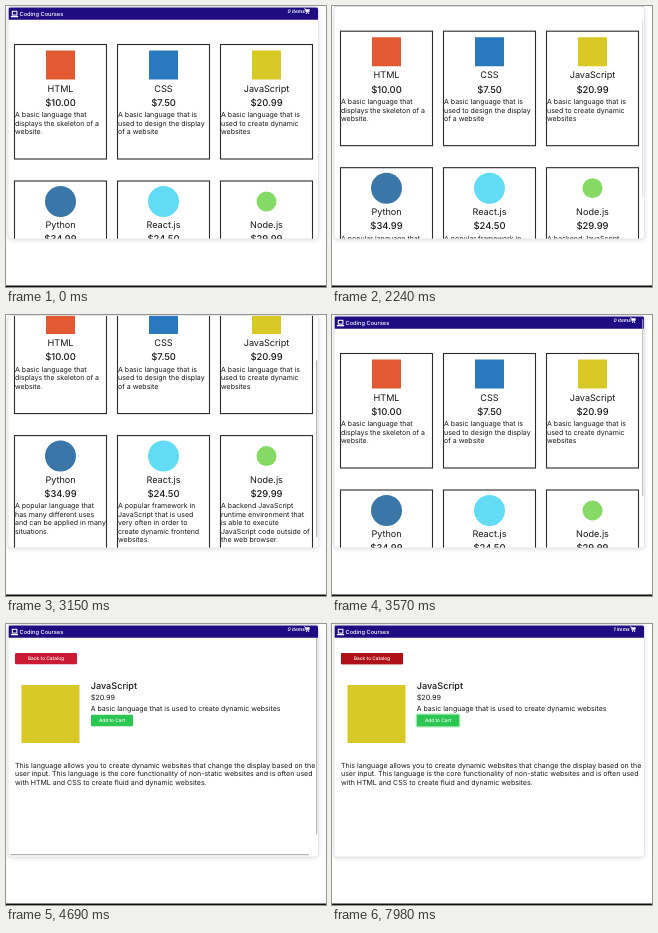
An HTML page with a canvas for the animation above (8 s loop, 320x281 px).

```html
<!DOCTYPE html>
<html lang="en">
<head>
<meta charset="utf-8">
<title>Course shop</title>
<style>
html, body { margin: 0; height: 100%; overflow: hidden; background: #fff; }
canvas { display: block; }
</style>
</head>
<body>
<canvas id="stage" width="320" height="281"></canvas>
<script>
const ctx = document.getElementById('stage').getContext('2d');
const LOOP = 8000, MAX_SCROLL = 63.5, PAGE_SWITCH = 4130, ADDED = 6300;
const INK = '#161618';
ctx.textRendering = 'geometricPrecision';

const courses = [
  { name: 'HTML', price: '$10.00', color: '#e35a32', size: 29,
    text: ['A basic language that', 'displays the skeleton of a', 'website.'] },
  { name: 'CSS', price: '$7.50', color: '#2a78bd', size: 29,
    text: ['A basic language that is', 'used to design the display', 'of a website'] },
  { name: 'JavaScript', price: '$20.99', color: '#d9c926', size: 29,
    text: ['A basic language that is', 'used to create dynamic', 'websites'] },
  { name: 'Python', price: '$34.99', color: '#3a76a8', size: 31, round: true,
    text: ['A popular language that', 'has many different uses', 'and can be applied in many', 'situations.'] },
  { name: 'React.js', price: '$24.50', color: '#62dcf5', size: 31, round: true,
    text: ['A popular framework in', 'JavaScript that is used', 'very often in order to', 'create dynamic frontend', 'websites.'] },
  { name: 'Node.js', price: '$29.99', color: '#85d965', size: 20, round: true,
    text: ['A backend JavaScript', 'runtime environment that', 'is able to execute', 'JavaScript code outside of', 'the web browser.'] }
];

const ramp = (t, from, to) => Math.min(1, Math.max(0, (t - from) / (to - from)));

// Piecewise linear value through [time, value] points
function track(t, points) {
  let [lastTime, value] = points[0];
  for (const [time, next] of points.slice(1)) {
    if (t < time) return value + (next - value) * ramp(t, lastTime, time);
    [lastTime, value] = [time, next];
  }
  return value;
}

const scrollAt = t => track(t, [[2170, 0], [2240, 13], [2310, 35], [2380, 51], [2450, 60],
  [2520, MAX_SCROLL], [3110, MAX_SCROLL], [3180, 48], [3250, 24], [3310, 8], [3360, 0]]);

function label(str, x, y, size, { color = INK, weight = 400, align = 'left', style = '' } = {}) {
  ctx.font = `${style} ${weight} ${size}px Inter, sans-serif`;
  ctx.fillStyle = color;
  ctx.textAlign = align;
  ctx.fillText(str, x, y);
}

function box(x, y, w, h, color, radius = 0) {
  ctx.fillStyle = color;
  ctx.beginPath();
  ctx.roundRect(x, y, w, h, radius);
  ctx.fill();
}

function badge({ color, round }, x, y, size) {
  box(x - size / 2, y - size / 2, size, size, color, round ? size / 2 : 0);
}

function paragraph(lines, x, y, lineHeight) {
  lines.forEach((line, i) => label(line, x, y + i * lineHeight, 7));
}

function faded(alpha, draw) {
  ctx.save();
  ctx.globalAlpha = alpha;
  draw();
  ctx.restore();
}

function button(str, x, y, w, base, dark, hover) {
  box(x, y, w, 11.4, base, 1.2);
  faded(hover, () => box(x, y, w, 11.4, dark, 1.2));
  label(str, x + w / 2, y + 7.5, 4.8, { color: '#fff', weight: 500, align: 'center' });
}

function laptopIcon() {
  ctx.strokeStyle = '#fff';
  ctx.lineWidth = 1;
  ctx.strokeRect(6.3, 5.3, 4.6, 3.8);
  box(4.8, 10, 7.4, 1.3, '#fff', 0.6);
}

function cartIcon() {
  ctx.strokeStyle = '#fff';
  ctx.lineWidth = 0.7;
  ctx.beginPath();
  ctx.moveTo(298, 2.8);
  ctx.lineTo(299.3, 2.8);
  ctx.lineTo(300.3, 6.4);
  ctx.lineTo(303, 6.4);
  ctx.stroke();
  box(299.6, 3.3, 4, 2.4, '#fff');
  box(299.9, 6.9, 1.2, 1.2, '#fff', 0.6);
  box(302.1, 6.9, 1.2, 1.2, '#fff', 0.6);
}

function header(t) {
  box(2.5, 1.5, 309.5, 12.2, '#200c82');
  laptopIcon();
  label('Coding Courses', 13.5, 10.4, 5.7, { color: '#fff', weight: 500 });
  label(`${t < ADDED ? 0 : 1} items`, 281.5, 7, 4.9, { color: '#fff', weight: 600, style: 'italic' });
  cartIcon();
}

function card(course, i) {
  const x = 8.5 + (i % 3) * 103, y = 38.5 + Math.floor(i / 3) * 136.5, mid = x + 46;
  ctx.strokeStyle = '#2a2a2a';
  ctx.lineWidth = 1.1;
  ctx.strokeRect(x, y, 92, 114.5);
  badge(course, mid, y + 20.5, course.size);
  label(course.name, mid, y + 47.3, 9.1, { align: 'center' });
  label(course.price, mid, y + 61.4, 9.4, { align: 'center', weight: 500 });
  paragraph(course.text, x + 0.5, y + 72.9, 8.5);
}

function catalog(t) {
  const scroll = scrollAt(t);
  ctx.save();
  ctx.translate(0, -scroll);
  header(t);
  courses.forEach(card);
  ctx.restore();
  const bar = t < 2870 ? ramp(t, 2200, 2310) * (1 - ramp(t, 2730, 2800))
    : ramp(t, 2870, 2940) * (1 - ramp(t, 3500, 3850));
  faded(bar, () => box(310, 4 + 48 * scroll / MAX_SCROLL, 1.3, 177, '#b4b4b4', 0.6));
}

function detail(t) {
  const course = courses[2];
  header(t);
  button('Back to Catalog', 9, 28.9, 62, '#cb1a33', '#b01119', ramp(t, 7770, 7910));
  badge(course, 44.5, 90, 58);
  label(course.name, 84.7, 64.7, 9.1, { weight: 500 });
  label(course.price, 84.7, 76, 7.2);
  label('A basic language that is used to create dynamic websites', 84.7, 87.2, 7);
  faded(ramp(t, ADDED, ADDED + 150), () => box(83.6, 89.4, 44.8, 14.2, '#a5e8b5', 2));
  button('Add to Cart', 85, 90.8, 42, '#2dc653', '#208f3f',
    ramp(t, 5180, 5320) - ramp(t, 7560, 7700));
  paragraph(['This language allows you to create dynamic websites that change the display based on the',
    'user input. This language is the core functionality of non-static websites and is often used',
    'with HTML and CSS to create fluid and dynamic websites.'], 9, 143.5, 8.5);
  faded(1 - ramp(t, 4830, 5110), () => {
    box(310, 14, 1.3, 196, '#b4b4b4', 0.6);
    box(4, 230, 299, 1.2, '#b4b4b4', 0.6);
  });
}

function draw(t) {
  box(0, 0, 320, 281, '#fff');
  box(0, 279.6, 320, 1.4, '#111');

  ctx.save();
  ctx.shadowColor = 'rgba(0,0,0,.13)';
  ctx.shadowBlur = 5;
  ctx.shadowOffsetY = 1;
  box(2, 0.5, 310.5, 232.5, '#fff', 3);
  ctx.restore();

  ctx.save();
  ctx.beginPath();
  ctx.roundRect(2, 0.5, 310.5, 232.5, [0, 0, 3, 3]);
  ctx.clip();
  (t < PAGE_SWITCH ? catalog : detail)(t);
  ctx.restore();

  ctx.strokeStyle = '#e2e2e2';
  ctx.lineWidth = 0.8;
  ctx.beginPath();
  ctx.roundRect(2, 0.5, 310.5, 232.5, 3);
  ctx.stroke();
}

const start = performance.now();
function tick() {
  draw((performance.now() - start) % LOOP);
  requestAnimationFrame(tick);
}
tick();
</script>
</body>
</html>
```
